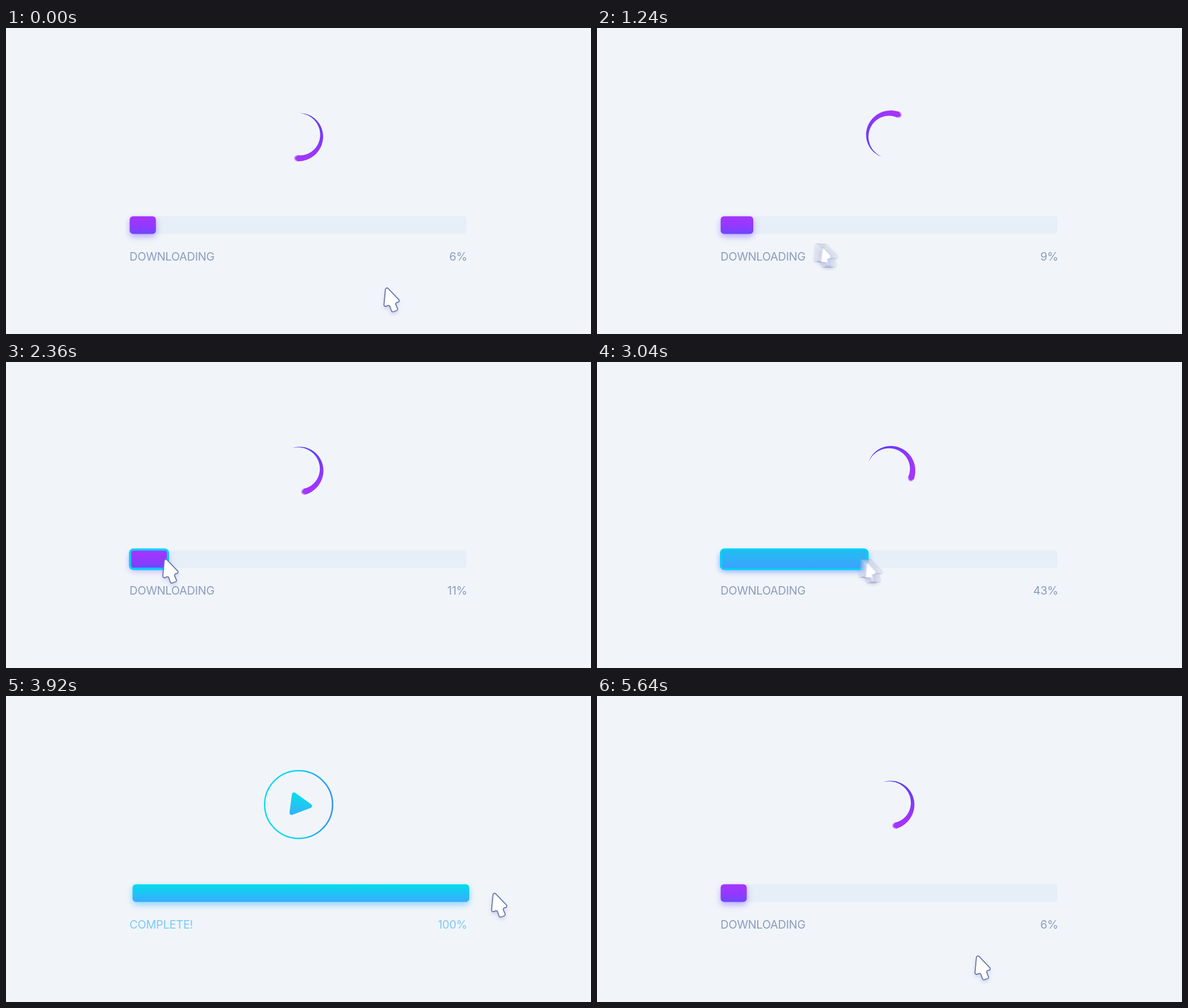
Write an HTML page with a canvas that moves like this. It is 1033 by 542 pixels and loops after 5.68 s.

```html
<!DOCTYPE html>
<html lang="en">
<head>
<meta charset="utf-8">
<title>Download progress</title>
<style>
  html, body { margin: 0; width: 100%; height: 100%; overflow: hidden; background: #f1f5f9; }
  canvas { display: block; width: 100%; height: 100%; }
</style>
</head>
<body>
<canvas id="stage" width="1033" height="542"></canvas>
<script>
const W = 1033, H = 542, LOOP = 5680, STEP = 40;
const GRAB = 2440, DONE = 3440;
const BAR = { x: 218.4, y: 333.6, w: 594.6, h: 31.2 };
const MUTED = '#8c9cbd', BRIGHT = '#7cc9f9';

const ctx = document.getElementById('stage').getContext('2d');
const blurLayer = new OffscreenCanvas(W, H).getContext('2d');

// Easing
const clamp = (v, lo, hi) => Math.max(lo, Math.min(hi, v));
const fade = (t, from, to) => clamp((t - from) / (to - from), 0, 1);
const mix = (a, b, u) => a + (b - a) * u;
const sine = u => (1 - Math.cos(Math.PI * u)) / 2;
const easeOut = power => u => 1 - (1 - u) ** power;
const backOut = s => u => 1 + (s + 1) * (u - 1) ** 3 + s * (u - 1) ** 2;
const springIn = backOut(6), popIn = backOut(2.5);

// Motion
const moves = [
  { from: 860, to: 1860, x: 184, y: 378, ease: u => sine(u ** 0.63), arc: easeOut(4) },
  { from: 1880, to: 2320, x: 280.5, y: 348, ease: sine },
  { from: GRAB, to: DONE, x: 816, y: 348, ease: u => u * u },
  { from: DONE, to: 3560, x: 861, y: 348, ease: easeOut(4) },
  { from: 4280, to: 4840, x: 525.5, y: 208, ease: sine },
  { from: 5040, to: 5480, x: 671, y: 459, ease: sine }
];

function cursorAt(t) {
  let x = 671, y = 459;
  for (const m of moves) {
    const u = m.ease(fade(t, m.from, m.to));
    x = mix(x, m.x, u);
    y = mix(y, m.y, m.arc ? m.arc(u) : u);
  }
  return { x, y };
}

const press = t => Math.sin(Math.PI * fade(t, 4880, 5040));
const hover = t => fade(t, 4680, 4840);
const spinnerAlpha = t => 1 - fade(t, 3380, 3600);
const spinnerHead = t => 184.5 + 0.45 * t;

function barShift(t) {
  const age = Math.max(0, t - 3400);
  return 38 * Math.exp(-age / 258) * Math.sin(2 * Math.PI * age / 420);
}

// Drawing helpers
function gradient(x0, y0, x1, y1, ...colors) {
  const g = ctx.createLinearGradient(x0, y0, x1, y1);
  colors.forEach((c, i) => g.addColorStop(i / (colors.length - 1), c));
  return g;
}

function layer(alpha, draw) {
  if (alpha <= 0) return;
  ctx.save();
  ctx.globalAlpha *= alpha;
  draw();
  ctx.restore();
}

function roundBox(x, y, w, h, r) {
  ctx.beginPath();
  ctx.roundRect(x, y, w, h, r);
}

function circle(x, y, r) {
  ctx.beginPath();
  ctx.arc(x, y, r, 0, 2 * Math.PI);
}

function roundPoly(c, points, r) {
  const n = points.length, [a, b] = [points[n - 1], points[0]];
  c.beginPath();
  c.moveTo((a[0] + b[0]) / 2, (a[1] + b[1]) / 2);
  points.forEach((p, i) => c.arcTo(...p, ...points[(i + 1) % n], r));
  c.closePath();
}

function shadow(c, color, y, blur) {
  c.shadowColor = color;
  c.shadowOffsetY = y;
  c.shadowBlur = blur;
}

// Progress bar
function drawTrack() {
  roundBox(BAR.x, BAR.y, BAR.w, BAR.h, 5);
  ctx.fillStyle = '#e6eef7';
  ctx.fill();
}

function drawFill(alpha, width, glow, ...colors) {
  layer(alpha, () => {
    shadow(ctx, glow, 5, 12);
    roundBox(BAR.x, BAR.y, width, BAR.h, 6);
    ctx.fillStyle = gradient(0, BAR.y, 0, BAR.y + BAR.h, ...colors);
    ctx.fill();
  });
}

const purpleFill = (alpha, w) => drawFill(alpha, w, 'rgba(112,70,255,.45)', '#a634ff', '#9539ff', '#6d47ff');
const cyanFill = (alpha, w) => drawFill(alpha, w, 'rgba(40,180,255,.5)', '#04dcec', '#3aacff');

function drawGrip(width) {
  roundBox(BAR.x + 0.8, BAR.y - 1.4, width - 1, BAR.h + 3.2, 6);
  ctx.lineWidth = 4;
  ctx.strokeStyle = '#00cff8';
  ctx.stroke();
}

// Spinner: a crescent that widens from tail to head, with a soft tip
function drawSpinner(headDegrees) {
  const R = 40, rad = Math.PI / 180, sweep = 183 * rad, n = 60;
  ctx.translate(517.3, 190.8);
  ctx.rotate((headDegrees - 90) * rad - sweep);
  const edge = (i, side) => {
    const a = i / n * sweep, r = R + side * 5.4 * i / n;
    ctx.lineTo(r * Math.cos(a), r * Math.sin(a));
  };
  ctx.beginPath();
  for (let i = 0; i <= n; i++) edge(i, 1);
  for (let i = n; i >= 0; i--) edge(i, -1);
  ctx.fillStyle = gradient(R, 0, -R, 0, '#5a3cff', '#7a38ff', '#a435ff');
  ctx.fill();
  const x = R * Math.cos(sweep), y = R * Math.sin(sweep);
  const soft = ctx.createRadialGradient(x, y, 2.5, x, y, 6.2);
  soft.addColorStop(0, '#a435ff');
  soft.addColorStop(1, 'rgba(164,53,255,0)');
  ctx.fillStyle = soft;
  circle(x, y, 6.2);
  ctx.fill();
}

// Play button
function drawPlay(t) {
  const x = 516.7, y = 192.3 + 1.9 * hover(t);
  const r = mix(34, 59.5, springIn(fade(t, 3446, 3950))) + 2.5 * hover(t) - 3 * press(t);
  layer(0.4 * fade(t, 3380, 3480) * (1 - fade(t, 3480, 3640)), () => {
    circle(x, 192.5, 40);
    ctx.lineWidth = 5;
    ctx.strokeStyle = gradient(x, 152, x, 232, '#12d8fa', '#3d9dff');
    ctx.stroke();
  });
  circle(x, y, r);
  layer(hover(t), () => {
    ctx.fillStyle = '#fff';
    ctx.fill();
  });
  layer(fade(t, 3440, 3480), () => {
    ctx.lineWidth = 2.5;
    ctx.strokeStyle = t < 3600 ? '#1cbdfb' : gradient(x - r, 0, x + r, 0, '#0bdcec', '#12d3f0', '#2b90f6');
    ctx.stroke();
  });
  const scale = popIn(fade(t, 3460, 4040));
  layer(scale > 0 ? 1 : 0, () => {
    ctx.translate(x + 1, y);
    ctx.rotate(Math.PI / 2 * (1 - fade(t, 3480, 4100)) ** 2);
    ctx.scale(scale, scale);
    roundPoly(ctx, [[-14, -21], [25, 0], [-14, 21]], 3.4);
    ctx.fillStyle = gradient(0, -18, 0, 18, '#08deea', '#36b0fb');
    ctx.fill();
  });
}

function drawSparks(t) {
  const age = t - 3420;
  const reach = 2.95 * (1 - Math.exp(-age / 145));
  const size = 5 * clamp(1.15 - age / 400, 0, 1);
  ctx.fillStyle = '#22b8fa';
  for (let i = 0; i < 4; i++) {
    const angle = 1.45 - 0.93 * i, d = (i % 2 ? 28 : 23) * reach;
    circle(838 + d * Math.cos(angle), 348 + d * Math.sin(angle), size * (0.7 + 0.1 * i));
    ctx.fill();
  }
}

// Labels
function label(text, x, align, color, squash = 1) {
  layer(squash > 0 ? 1 : 0, () => {
    ctx.translate(x, 397);
    ctx.scale(1, squash);
    ctx.font = '400 20px Inter, "Open Sans", sans-serif';
    ctx.letterSpacing = '-0.3px';
    ctx.textAlign = align;
    ctx.fillStyle = color;
    ctx.fillText(text, 0, 14.8);
  });
}

const status = (text, color, squash) => label(text, 218, 'left', color, squash);
const percent = (value, color) => label(value + '%', 814.3, 'right', color);

// Cursor with motion blur
const ARROW = [[-0.5, -2], [26, 25.5], [16, 28], [21.5, 40.5], [10.5, 44.5], [6, 31.5], [-4, 35.5]];

function paintCursor(c, t, alpha) {
  const { x, y } = cursorAt(t), scale = 1 - 0.12 * press(t);
  c.save();
  c.globalAlpha = alpha;
  c.translate(x, y);
  c.scale(scale, scale);
  roundPoly(c, ARROW, 2.8);
  shadow(c, 'rgba(120,110,225,.32)', 4, 7);
  c.fillStyle = '#fff';
  c.fill();
  c.shadowColor = 'transparent';
  c.lineWidth = 1.8;
  c.strokeStyle = '#6878a6';
  c.stroke();
  c.restore();
}

function drawCursor(t) {
  const shutter = 25, samples = 16;
  const a = cursorAt(t - shutter / 2), b = cursorAt(t + shutter / 2);
  if (Math.hypot(b.x - a.x, b.y - a.y) < 1) return paintCursor(ctx, t, 1);
  blurLayer.clearRect(0, 0, W, H);
  blurLayer.globalCompositeOperation = 'lighter';
  for (let i = 0; i < samples; i++) {
    paintCursor(blurLayer, t + shutter * (i / (samples - 1) - 0.5), 1 / samples);
  }
  ctx.drawImage(blurLayer.canvas, 0, 0);
}

// Scenes
function drawDownload(t) {
  const dragging = t > GRAB;
  const width = dragging ? clamp(cursorAt(t).x + 4.5 - BAR.x, 67, BAR.w) : 46.3 + 0.0091 * t;
  const value = dragging ? Math.floor(width / BAR.w * 100) : Math.round(6 + 0.00215 * t);
  const cyan = fade(t, GRAB, 3200);
  drawTrack();
  purpleFill(cyan < 1 ? 1 : 0, width);
  cyanFill(cyan, width);
  layer(fade(t, 2240, 2320) * (1 - fade(t, 3200, 3400)), () => drawGrip(width));
  layer(spinnerAlpha(t), () => drawSpinner(spinnerHead(t)));
  status('DOWNLOADING', MUTED);
  percent(value, MUTED);
}

function drawComplete(t) {
  layer(1, () => {
    ctx.translate(barShift(t), 0);
    cyanFill(1, BAR.w);
  });
  layer(spinnerAlpha(t), () => drawSpinner(spinnerHead(t)));
  drawPlay(t);
  status('DOWNLOADING', MUTED, 1 - fade(t, 3420, 3580));
  status('COMPLETE!', BRIGHT, fade(t, 3580, 3680));
  percent(100, BRIGHT);
  drawSparks(t);
}

function drawRestart(t) {
  drawTrack();
  purpleFill(1, 46);
  layer(1, () => drawSpinner(spinnerHead(t - 80)));
  status('DOWNLOADING', MUTED);
  percent(6, MUTED);
}

function render(t) {
  ctx.fillStyle = '#f1f5f9';
  ctx.fillRect(0, 0, W, H);
  if (t < DONE) {
    drawDownload(t);
  } else {
    layer(fade(t, 5160, 5480), () => drawRestart(t));
    layer(1 - fade(t, 4920, 5200), () => drawComplete(t));
  }
  drawCursor(t);
}

const start = performance.now();
function tick() {
  const t = (performance.now() - start) % LOOP;
  render(Math.floor(t / STEP) * STEP);
  requestAnimationFrame(tick);
}
tick();
</script>
</body>
</html>
```
